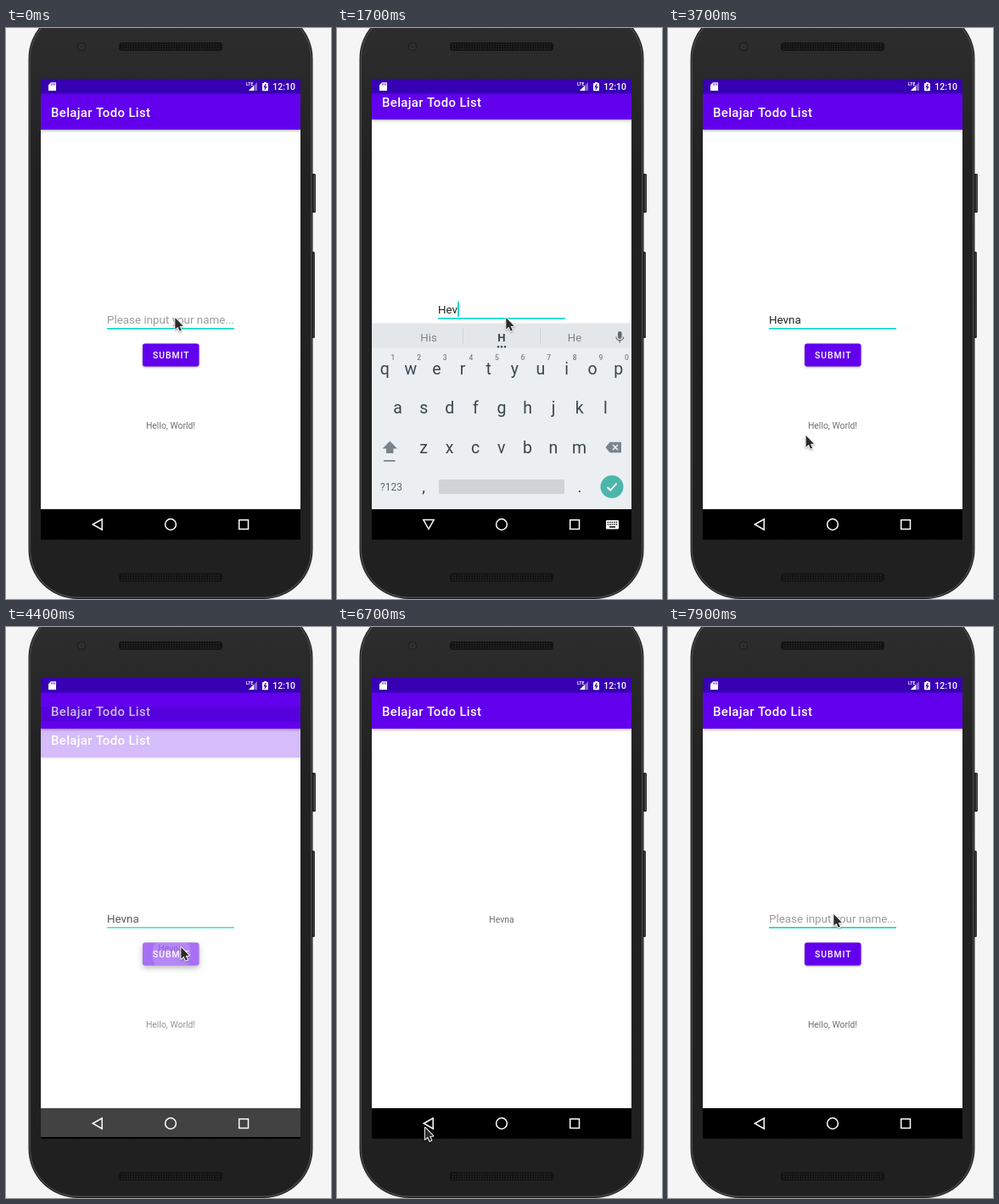
An HTML page with a canvas for the animation above (8 s loop, 383 by 674 pixels).

```html
<!DOCTYPE html>
<html lang="id">
<head>
<meta charset="utf-8">
<title>Belajar Todo List</title>
<style>
html, body { margin: 0; width: 100%; height: 100%; overflow: hidden; background: #f5f5f5; }
canvas { display: block; width: 383px; height: 674px; }
</style>
</head>
<body>
<canvas id="stage"></canvas>
<script>
const W = 383, H = 674, LOOP = 8000, STEP = 100;
const LEFT = 41, TOP = 60, WIDTH = 306, HEIGHT = 544, NAV_TOP = 568, MID = 194;
const PITCH = 30.6;
const PURPLE = '#6200ee', DARK_PURPLE = '#3700b3', TEAL = '#03dac5';
const KEY = '#37474f', KEY_SOFT = '#78858b', KEY_BG = '#eceff1';
const NAME = 'Hevna';
const dpr = window.devicePixelRatio || 1;

function prepare(canvas) {
  canvas.width = W * dpr;
  canvas.height = H * dpr;
  const c = canvas.getContext('2d');
  c.scale(dpr, dpr);
  return c;
}
const main = prepare(document.getElementById('stage'));
const buffer = prepare(document.createElement('canvas'));
let g = main;

// Timing
const ramp = (t, a, b) => Math.min(1, Math.max(0, (t - a) / (b - a)));
const smooth = p => p * p * (3 - 2 * p);
const easeOut = p => 1 - (1 - p) ** 3;
const mix = (a, b, p) => a + (b - a) * p;
const within = (t, a, b) => t >= a && t < b;

const keyboardShown = t => easeOut(ramp(t, 200, 600)) * (1 - easeOut(ramp(t, 3400, 3700)));
const resultShown = t => smooth(ramp(t, 4300, 4600)) * (1 - smooth(ramp(t, 7000, 7400)));

function typedText(t) {
  if (!within(t, 1400, 7000)) return '';
  return NAME.slice(0, Math.max(1, Math.floor((t - 1400) / STEP)));
}

function pointerAt(t) {
  let x = 198.5, y = 341;
  const glide = (a, b, toX, toY) => {
    const p = smooth(ramp(t, a, b));
    x = mix(x, toX, p);
    y = mix(y, toY, p);
  };
  glide(2600, 3300, 118, 583);
  glide(3500, 3900, 205.5, 377);
  if (t >= 5200) {
    // One turn around the name
    const angle = 0.65 - 6.77 * ramp(t, 5200, 6100) ** 1.3;
    x = 190 + 19 * Math.cos(angle);
    y = 354 + 37 * Math.sin(angle);
  }
  glide(6100, 6700, 103, 590);
  glide(7200, 7800, 190, 309);
  glide(7800, 7900, 194.5, 338);
  return [x, y];
}

// Drawing helpers
function rect(x, y, w, h, color) {
  g.fillStyle = color;
  g.fillRect(x, y, w, h);
}
function round(x, y, w, h, r, color) {
  g.beginPath();
  g.roundRect(x, y, w, h, r);
  g.fillStyle = color;
  g.fill();
}
function disc(x, y, r, color) {
  g.beginPath();
  g.arc(x, y, r, 0, 7);
  g.fillStyle = color;
  g.fill();
}
function trace(points, close = true) {
  g.beginPath();
  points.forEach(([x, y]) => g.lineTo(x, y));
  if (close) g.closePath();
}
function poly(points, color) {
  trace(points);
  g.fillStyle = color;
  g.fill();
}
function line(points, color, width, close) {
  trace(points, close);
  g.strokeStyle = color;
  g.lineWidth = width;
  g.stroke();
}
function text(s, x, y, size, color, { weight = 400, align = 'left', spacing = 0 } = {}) {
  g.font = `${weight} ${size}px Roboto, sans-serif`;
  g.letterSpacing = spacing + 'px';
  g.textAlign = align;
  g.fillStyle = color;
  g.fillText(s, x, y);
}
const centered = (s, x, y, size, color, weight) => text(s, x, y, size, color, { weight, align: 'center' });

function grid(cols, rows, x, y, dx, dy, size, color) {
  for (let r = 0; r < rows; r++)
    for (let i = 0; i < cols; i++) rect(x + i * dx, y + r * dy, size, size, color);
}

function shadowed(color, blur, dy, draw) {
  g.save();
  g.shadowColor = color;
  g.shadowBlur = blur * dpr;
  g.shadowOffsetY = dy * dpr;
  draw();
  g.restore();
}

// Paints a group in the buffer, then blends it as a whole
function layer(alpha, dy, draw) {
  if (alpha <= 0) return;
  buffer.clearRect(0, 0, W, H);
  g = buffer;
  draw();
  g = main;
  g.save();
  g.globalAlpha = alpha;
  g.drawImage(buffer.canvas, 0, dy, W, H);
  g.restore();
}

function clipped(x, y, w, h, r, draw) {
  g.save();
  g.beginPath();
  g.roundRect(x, y, w, h, r);
  g.clip();
  draw();
  g.restore();
}

// Device
function speaker(y) {
  round(133, y, 122, 10, 4, '#121212');
  grid(39, 3, 136, y + 1.7, 3, 2.7, 1.3, '#303030');
}

function phone() {
  rect(0, 0, W, H, '#f5f5f5');
  round(359, 172, 6, 46, 1.5, '#2a2a2a');
  rect(363, 174, 1, 42, '#555');
  round(359, 264, 5, 102, 1.5, '#2a2a2a');
  rect(362.5, 266, 0.8, 98, '#555');
  const shade = g.createLinearGradient(0, 0, 0, H);
  shade.addColorStop(0, '#2d2d2d');
  shade.addColorStop(0.25, '#212121');
  shade.addColorStop(1, '#202020');
  const body = (inset, color) =>
    round(26.5 + inset, inset - 22, 335 - 2 * inset, 696 - 2 * inset, 58 - inset, color);
  body(0, '#161616');
  body(1, '#484848');
  body(2.5, shade);
  speaker(17);
  speaker(643.5);
  disc(89, 22, 5.5, '#222');
  disc(89, 22, 3.5, '#343434');
  disc(89, 22, 1.8, '#26262c');
}

// App windows
function toolbar() {
  shadowed('rgba(0,0,0,.35)', 3, 1, () => rect(LEFT, TOP, WIDTH, 60, PURPLE));
  text('Belajar Todo List', 53, 104.5, 14.9, '#fff', { weight: 500, spacing: 0.37 });
}

function appWindow(pan, content) {
  rect(LEFT, TOP, WIDTH, HEIGHT, '#fff');
  g.save();
  g.translate(0, pan);
  toolbar();
  content();
  g.restore();
  rect(LEFT, TOP, WIDTH, 17.5, DARK_PURPLE);
  rect(LEFT, NAV_TOP, WIDTH, 36, '#000');
}

function button(t) {
  const pressed = within(t, 4300, 4600);
  shadowed('rgba(0,0,0,.35)', pressed ? 6 : 2.5, pressed ? 3 : 1,
    () => round(161, 372.5, 66.5, 27, 3, PURPLE));
  if (pressed) clipped(161, 372.5, 66.5, 27, 3, () => {
    rect(161, 372, 67, 28, 'rgba(255,255,255,.24)');
    disc(195, 386, mix(12, 34, ramp(t, 4300, 4500)), 'rgba(255,255,255,.16)');
  });
  text('SUBMIT', 173, 390, 10.4, '#fff', { weight: 500, spacing: 0.93 });
}

function caret(t, typed) {
  if (!within(t, 100, 600) && !within(t, 1100, 3600)) return;
  const x = 119 + (typed ? g.measureText(typed).width : 0);
  const settled = t >= 2000;
  rect(x, 335, typed && !settled ? 2 : 1, 18, settled ? '#555' : TEAL);
}

function formScreen(t) {
  appWindow(-12 * keyboardShown(t) ** 2, () => {
    const typed = typedText(t);
    text(typed || 'Please input your name...', 119, 349, 13.4, typed ? '#212121' : '#9b9b9b');
    caret(t, typed);
    rect(119, 354, 150, 1.6, TEAL);
    button(t);
    centered('Hello, World!', MID, 472.5, 10.4, '#6f6f6f');
  });
}

function resultScreen() {
  appWindow(0, () => centered(NAME, MID, 348.5, 10.4, '#6f6f6f'));
}

// Keyboard
function keyRow(letters, x, y, size = 19.5, color = KEY, weight = 400) {
  [...letters].forEach((c, i) => centered(c, x + i * PITCH, y, size, color, weight));
}

function microphone() {
  round(331, 358, 4.6, 9, 2.3, '#5f6b70');
  g.beginPath();
  g.arc(333.3, 364.5, 4.4, 0, Math.PI);
  g.strokeStyle = '#5f6b70';
  g.lineWidth = 1.2;
  g.stroke();
  rect(332.6, 368.5, 1.4, 3, '#5f6b70');
}

function suggestions(t) {
  rect(LEFT, 349, WIDTH, 28.5, '#e4e7e9');
  microphone();
  if (t < 1600) return;
  const words = t < 2000 ? ['His', 'H', 'He'] : ["Hero's", NAME, 'Hurts'];
  words.forEach((w, i) =>
    centered(w, 108 + i * 86, 369.5, 13.2, i === 1 ? KEY : KEY_SOFT, w.length === 1 ? 700 : 400));
  [148, 239].forEach(x => rect(x, 355, 1, 18, '#cdd2d4'));
  [-4, 0, 4].forEach(dx => disc(MID + dx, 376.3, 1.2, KEY));
}

function keyboard(t) {
  shadowed('rgba(0,0,0,.16)', 2, -0.5, () => rect(LEFT, 349, WIDTH, 255, KEY_BG));
  suggestions(t);
  keyRow('qwertyuiop', 56.3, 408.5);
  keyRow('1234567890', 66, 392, 8.5, KEY_SOFT, 500);
  keyRow('asdfghjkl', 71.6, 455);
  keyRow('zxcvbnm', 102, 502);
  poly([[62.3, 487.5], [71, 496.5], [53.6, 496.5]], KEY_SOFT);
  rect(58, 496, 8.5, 6, KEY_SOFT);
  rect(55, 510, 13.5, 1.8, KEY_SOFT);
  poly([[316.5, 495], [321.5, 488.7], [335, 488.7], [335, 501.3], [321.5, 501.3]], KEY_SOFT);
  [-3, 3].forEach(d => line([[328 - d, 495 - 3], [328 + d, 495 + 3]], KEY_BG, 1.6, false));
  centered('?123', 64, 546, 12, '#5a686f');
  centered(',', 102, 548, 19, KEY);
  round(120, 533, 148, 17, 2.5, '#cfd3d5');
  centered('.', 286, 548, 19, KEY);
  disc(324, 541.5, 13.5, '#4db6ac');
  line([[318.5, 542], [322.2, 545.7], [329.5, 537.7]], '#fff', 1.8, false);
}

// System icons
function statusIcons() {
  poly([[53, 64.3], [59, 64.3], [59, 74], [50, 74], [50, 67.3]], '#fff');
  grid(3, 2, 53.2, 65.5, 1.9, 1, 1, DARK_PURPLE);
  poly([[296, 64], [296, 74], [286, 74]], 'rgba(255,255,255,.4)');
  poly([[292, 68], [292, 74], [286, 74]], '#fff');
  text('LTE', 283, 68.3, 5.2, '#fff', { weight: 700 });
  round(302, 65, 7, 9.2, 0.8, '#fff');
  rect(304, 64, 3, 1.5, '#fff');
  line([[306.2, 66.3], [304.4, 69.6], [306.6, 69.6], [304.8, 72.8]], DARK_PURPLE, 1.2, false);
  text('12:10', 341, 72.8, 10.5, '#fff', { weight: 500, align: 'right' });
}

function backRipple(t, start) {
  if (t < start) return;
  const alpha = 0.2 * (1 - ramp(t, start + 100, start + 400));
  round(71, NAV_TOP, 74, 36, 18, `rgba(255,255,255,${alpha})`);
}

function navIcons(t) {
  backRipple(t, 3300);
  backRipple(t, 7000);
  const open = within(t, 300, 3400);
  line(open ? [[101.8, 580.5], [114.2, 580.5], [108, 591.5]]
            : [[102.3, 586], [113.2, 579.8], [113.2, 592.2]], '#fff', 1.5, true);
  g.beginPath();
  g.arc(MID, 586, 6.4, 0, 7);
  g.stroke();
  g.strokeRect(274.7, 580.7, 10.8, 10.8);
  if (!open) return;
  round(317, 581, 15, 10.5, 1.2, '#fff');
  grid(5, 2, 318.7, 582.7, 2.5, 2.5, 1.4, '#000');
  rect(321, 588.2, 7, 1.5, '#000');
}

function pointer([x, y]) {
  g.save();
  g.translate(x, y);
  g.lineJoin = 'round';
  const arrow = [[0.8, 1], [0.8, 14.8], [4, 11.8], [6.2, 16.8], [8.4, 15.8], [6.2, 10.9], [10.3, 10.7]];
  shadowed('rgba(0,0,0,.35)', 2, 1, () => line(arrow, '#fff', 1.9, true));
  poly(arrow, '#2b2b2b');
  g.restore();
}

function render(t) {
  const keys = keyboardShown(t), result = resultShown(t);
  phone();
  clipped(LEFT, TOP, WIDTH, HEIGHT, 0, () => {
    formScreen(t);
    clipped(LEFT, TOP, WIDTH, NAV_TOP - TOP, 0,
      () => layer(keys, 24 * (1 - keys), () => keyboard(t)));
    const drop = Math.round(46 * (1 - result));
    clipped(LEFT, TOP + drop, WIDTH, HEIGHT, 0, () => layer(result, drop, resultScreen));
    statusIcons();
    navIcons(t);
  });
  pointer(pointerAt(t));
}

const start = performance.now();
function tick() {
  const t = (performance.now() - start) % LOOP;
  render(Math.floor(t / STEP) * STEP);
  requestAnimationFrame(tick);
}
tick();
</script>
</body>
</html>
```
